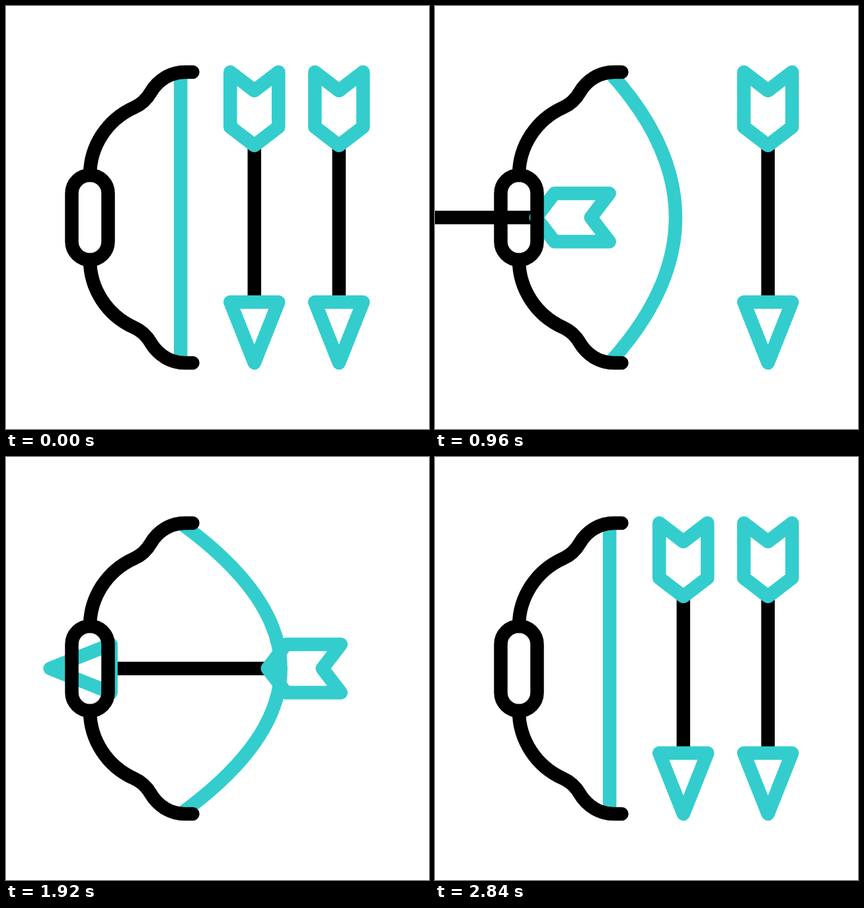
An HTML page that plays this animation: 640x640 px, repeating every 3000 ms.

```html
<!DOCTYPE html>
<html lang="en">
<head>
<meta charset="utf-8">
<title>Bow and arrows</title>
<style>
  html, body { margin: 0; width: 100%; height: 100%; overflow: hidden; background: #fff; }
  svg { display: block; width: 100%; height: 100%; }
  .line { fill: none; stroke: #000; stroke-width: 20.5; stroke-linecap: round; stroke-linejoin: round; }
  .teal { stroke: #33cdcd; }
  .shaft { stroke-linecap: butt; }
</style>
</head>
<body>
<svg viewBox="0 0 640 640">
  <defs>
    <g id="arrow">
      <path class="line shaft" d="M0-109V128"/>
      <path class="line teal" d="M-36.5-220L0-192L36.5-220V-137L0-109L-36.5-137Z"/>
      <path class="line teal" d="M-36.5 128H36.5L0 220Z"/>
    </g>
    <path id="limb" class="line" d="M282.5 100H271C249 100 230 112 219 130.500C213 141 204 149 194 153.500C153 172 127 212 127 256"/>
  </defs>
  <use id="right" href="#arrow"/>
  <use id="left" href="#arrow"/>
  <path id="string" class="line teal"/>
  <use href="#limb"/>
  <use href="#limb" transform="translate(0 640) scale(1 -1)"/>
  <rect class="line" x="99.500" y="256" width="55" height="128" rx="27.500"/>
</svg>
<script>
  const LOOP = 3000, STEP = 40;
  const get = id => document.getElementById(id);

  const smooth = p => p * p * (3 - 2 * p);
  const easeIn = p => p ** 3.1;
  const easeOut = n => p => 1 - (1 - p) ** n;
  const hold = () => 0;

  // Key: [time, values, easing towards this key]
  function track(keys, t) {
    const i = keys.findIndex(k => k[0] > t);
    if (i === 0) return keys[0][1];
    if (i < 0) return keys[keys.length - 1][1];
    const [t0, from] = keys[i - 1];
    const [t1, to, ease = smooth] = keys[i];
    const s = ease((t - t0) / (t1 - t0));
    return from.map((v, j) => v + (to[j] - v) * s);
  }

  // Values: x, y, angle
  const flight = (x, start, nock, drawn, drop) => [
    [start, [x, 320, 0]],
    [start + 400, [nock, 320, 90], easeIn],
    [start + 600, [drawn, 320, 90], easeOut(2.75)],
    [start + 1000, [drawn - 720, 320, 90]],
    [drop, [x - 1.2, -320, 0], hold],
    [drop + 400, [x, 320, 0]]
  ];

  const arrows = [
    [get('left'), flight(375.8, 200, 257.5, 297.2, 2093)],
    [get('right'), flight(503.8, 1400, 252.5, 289.7, 2433)]
  ];

  const pull = [600, 1800].flatMap(t => [
    [t, [0]],
    [t + 200, [154], easeOut(4.5)],
    [t + 600, [0]]
  ]);

  function draw() {
    const t = Math.floor(performance.now() % LOOP / STEP) * STEP;
    for (const [el, keys] of arrows) {
      const [x, y, a] = track(keys, t);
      el.setAttribute('transform', `translate(${x} ${y}) rotate(${a})`);
    }
    const [d] = track(pull, t);
    get('string').setAttribute('d', `M264.2 100Q${264.2 + 2 * d} 320 264.2 540`);
    requestAnimationFrame(draw);
  }
  draw();
</script>
</body>
</html>
```
